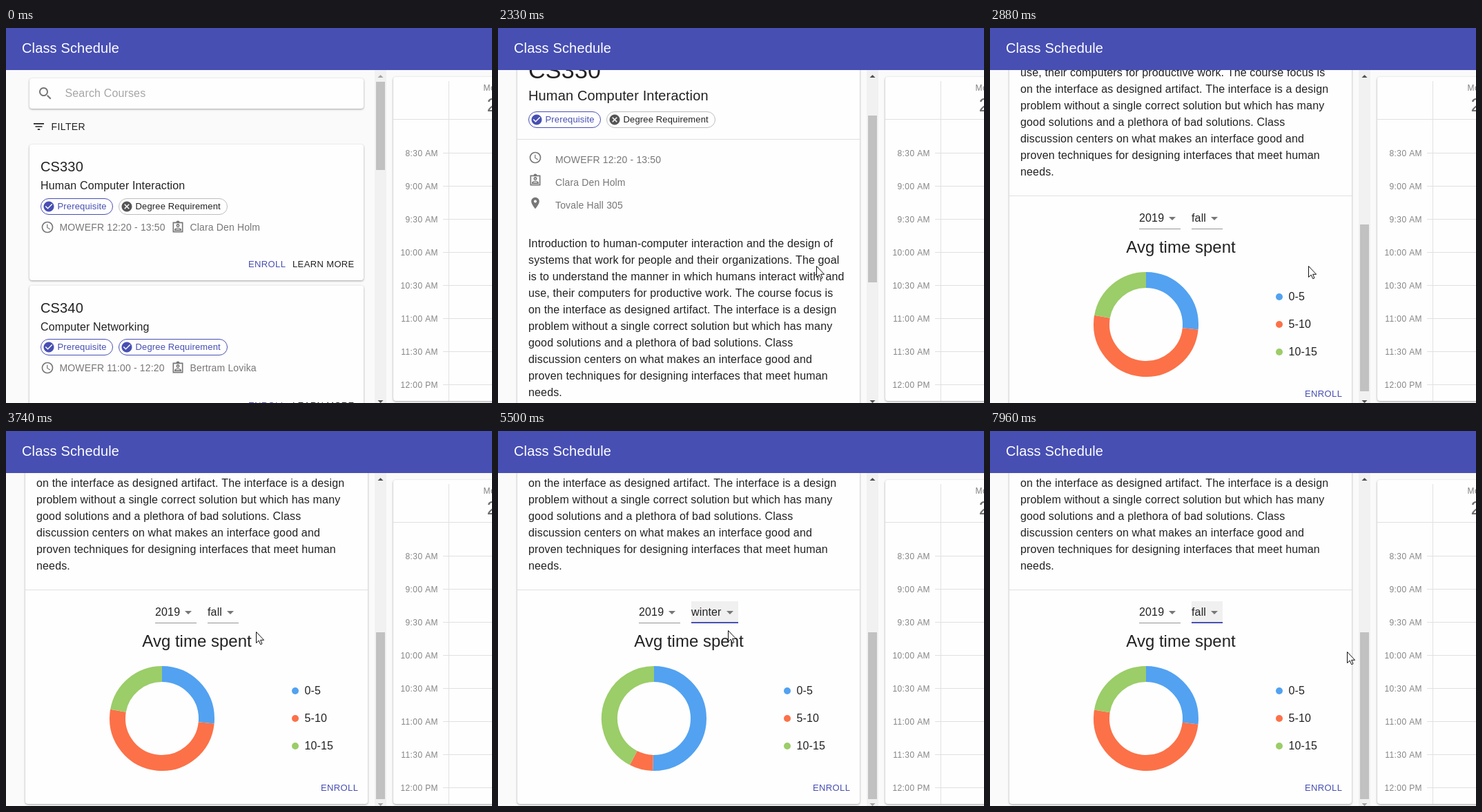
An HTML page with a canvas for the animation above (8000 ms loop, 704x544 px).

```html
<!DOCTYPE html>
<html lang="en">
<head>
<meta charset="utf-8">
<title>Class Schedule</title>
<style>
html, body { margin: 0; width: 100%; height: 100%; overflow: hidden; background: #fafafa; }
canvas { display: block; }
</style>
</head>
<body>
<canvas id="stage" width="704" height="544"></canvas>
<script>
const ctx = document.getElementById('stage').getContext('2d');
const LOOP = 8000;
const INDIGO = '#474fb3', INK = '#222', GREY = '#777', RULE = '#e0e0e0';
const SERIES = [['#52a2f1', '0-5'], ['#fc7148', '5-10'], ['#9bcd68', '10-15']];
const FALL = [95.6, 280], WINTER = [187.2, 202.5];   // slice ends in degrees
const TEACHER = 'Clara Den Holm', HOURS = 'MOWEFR 12:20 - 13:50';

// The picture only moves inside these spans, in 80 ms steps.
const SPANS = [[450, 930], [1320, 1320], [1470, 1550], [2330, 2570], [2720, 2960],
  [3500, 4220], [4380, 4460], [4700, 4700], [4860, 5900], [6060, 6300],
  [6450, 6680], [6840, 6920], [7080, 7960]];
const CLICKS = [[1320, 1470], [3980, 4060], [4700, 4860], [6450, 6530], [7080, 7160]];
// time, x, y of the pointer
const PATH = [[400, 590, 546], [930, 461, 345], [3430, 461, 345], [3900, 325, 271],
  [4300, 325, 271], [4460, 333, 294], [4860, 333, 294], [5020, 333, 289], [6000, 333, 289],
  [6300, 331, 270], [6760, 331, 270], [6920, 331, 229], [7080, 331, 229], [7880, 517, 320]];

const DESCRIPTION = [
  'Introduction to human-computer interaction and the design of',
  'systems that work for people and their organizations. The goal',
  'is to understand the manner in which humans interact with, and',
  'use, their computers for productive work. The course focus is',
  'on the interface as designed artifact. The interface is a design',
  'problem without a single correct solution but which has many',
  'good solutions and a plethora of bad solutions. Class',
  'discussion centers on what makes an interface good and',
  'proven techniques for designing interfaces that meet human',
  'needs.'];

const ICONS = {
  search: 'M9.5 3a6.5 6.5 0 1 0 .01 0zM9.5 5a4.5 4.5 0 1 1-.01 0zM14 15.5l1.5-1.5 5 5-1.5 1.5z',
  filter: 'M3 6h18v2H3zM6 11h12v2H6zM10 16h4v2h-4z',
  clock: 'M12 2a10 10 0 1 0 .01 0zM12 4a8 8 0 1 1-.01 0zM11 7h1.5v5.25l4.5 2.67-.75 1.23L11 13z',
  badge: 'M3 3h6a3 2.4 0 0 1 6 0h6v18H3zM5 5v14h14V5zM12 6a3 3 0 1 0 .01 0zM12 8a1 1 0 1 1-.01 0z' +
    'M6 16.5c0-5 12-5 12 0V18H6zM8 16h8c-1-2-7-2-8 0z',
  pin: 'M12 2c-3.9 0-7 3.1-7 7 0 5.3 7 13 7 13s7-7.7 7-13c0-3.9-3.1-7-7-7zM12 6.5a2.5 2.5 0 1 1-.01 0z',
  yes: 'M12 2a10 10 0 1 0 .01 0zM10 17l-5-5 1.4-1.4 3.6 3.6 7.6-7.6L19 8z',
  no: 'M12 2a10 10 0 1 0 .01 0zM17 15.6L15.6 17 12 13.4 8.4 17 7 15.6l3.6-3.6L7 8.4 8.4 7l3.6 3.6L15.6 7 17 8.4 13.4 12z'
};
for (const name in ICONS) ICONS[name] = new Path2D(ICONS[name]);
const ARROW = new Path2D('M.5.5v16l3.7-3.4 2.5 5.6 2.3-1-2.4-5.4h5z');
const HAND = new Path2D('M-2 2a2 2 0 0 1 4 0v6c.8-1 2.8-.7 3 .8 .8-.8 2.4-.4 2.6 1 .9-.6 2.4 0 2.4 1.6V15' +
  'c0 2-1.3 3.6-1.8 5.2V22.5H0V20.5c-1.3-2-4.4-5.5-5.4-7.6-.8-2 1-3 2.4-1.6l1 1.2z');

const ramp = (t, a, b) => Math.min(1, Math.max(0, (t - a) / (b - a)));
const mix = (a, b, k) => a + (b - a) * k;
const smooth = k => k * k * (3 - 2 * k);
const easeOut = (k, power) => 1 - (1 - k) ** power;

function stepped(t) {
  let now = 0;
  for (const [a, b] of SPANS) if (t >= a) now = Math.min(b, a + Math.floor((t - a) / 80) * 80);
  return now;
}

function rect(x, y, w, h, color) {
  ctx.fillStyle = color;
  ctx.fillRect(x, y, w, h);
}

function round(x, y, w, h, r) {
  ctx.beginPath();
  ctx.roundRect(x, y, w, h, r);
}

function disc(x, y, r, color) {
  ctx.beginPath();
  ctx.arc(x, y, r, 0, 7);
  ctx.fillStyle = color;
  ctx.fill();
}

function text(s, x, y, size = 16, color = INK, spacing = .15, align = 'left') {
  ctx.font = size + 'px "Liberation Sans", Arial, sans-serif';
  ctx.letterSpacing = spacing + 'px';
  ctx.textAlign = align;
  ctx.fillStyle = color;
  ctx.fillText(s, x, Math.round(y));
}

function icon(name, cx, cy, size, color) {
  ctx.save();
  ctx.translate(cx - size / 2, cy - size / 2);
  ctx.scale(size / 24, size / 24);
  ctx.fillStyle = color;
  ctx.fill(ICONS[name], 'evenodd');
  ctx.restore();
}

function paper(x, y, w, h, blur = 3, drop = 1, shade = .36) {
  ctx.save();
  ctx.shadowColor = `rgba(0,0,0,${shade})`;
  ctx.shadowBlur = blur;
  ctx.shadowOffsetY = drop;
  ctx.fillStyle = '#fefefe';
  round(x, y, w, h, 4);
  ctx.fill();
  ctx.restore();
}

function triangle(cx, y, half, h, color) {
  ctx.beginPath();
  ctx.moveTo(cx - half, y);
  ctx.lineTo(cx + half, y);
  ctx.lineTo(cx, y + h);
  ctx.fillStyle = color;
  ctx.fill();
}

function chip(x, y, w, label, on) {
  round(x + .5, y + .5, w - 1, 23, 11.5);
  ctx.strokeStyle = on ? INDIGO : '#bdbdbd';
  ctx.lineWidth = 1;
  ctx.stroke();
  icon(on ? 'yes' : 'no', x + 12, y + 12, 18, on ? INDIGO : '#555');
  text(label, x + 24.5, y + 16, 13, on ? INDIGO : INK);
}

function chips(x, y, required) {
  chip(x, y, 105, 'Prerequisite', true);
  chip(x + 113, y, 158, 'Degree Requirement', required);
}

function courseCard(y, code, name, hours, teacher, required, hover) {
  paper(34, y, 484, 197);
  text(code, 50, y + 39, 20);
  text(name, 50, y + 65);
  chips(50, Math.round(y + 77.8), required);
  const row = Math.round(y + 119.8);
  icon('clock', 60, row, 20, GREY);
  text(hours, 77.5, row + 5, 14, GREY);
  icon('badge', 249, row, 20, GREY);
  text(teacher, 266.5, row + 5, 14, GREY);
  if (hover) {
    round(410, y + 158, 100, 30, 4);
    ctx.fillStyle = 'rgba(0,0,0,.04)';
    ctx.fill();
  }
  text('ENROLL', 351, y + 178, 13, INDIGO, .37);
  text('LEARN MORE', 415, y + 178, 13, INK, .37);
}

function listPage(hover) {
  paper(34, 73, 484, 44);
  icon('search', 57, 95, 24, GREY);
  text('Search Courses', 85.5, 100, 16, '#a6a6a6');
  icon('filter', 47.5, 143, 20, INK);
  text('FILTER', 65.5, 148, 14, INK, .4);
  courseCard(169, 'CS330', 'Human Computer Interaction', HOURS, TEACHER, false, hover);
  courseCard(373.5, 'CS340', 'Computer Networking', 'MOWEFR 11:00 - 12:20', 'Bertram Lovika', true);
}

function select(x, w, label, focused) {
  if (focused) rect(x, 679, w, 32, '#f0f0f0');
  text(label, x, 700);
  triangle(x + w - 12, 693, 5, 5, GREY);
  if (focused) rect(x, 709, w, 2, INDIGO);
  else rect(x, 710, w, 1, '#949494');
}

function donut(k) {
  const ends = [0, mix(FALL[0], WINTER[0], k), mix(FALL[1], WINTER[1], k), 360];
  ctx.lineWidth = 23;
  SERIES.forEach(([color, label], i) => {
    ctx.beginPath();
    ctx.arc(226, 849, 64.5, (ends[i] - 90) * Math.PI / 180, (ends[i + 1] - 90) * Math.PI / 180);
    ctx.strokeStyle = color;
    ctx.stroke();
    disc(419, 809 + 40 * i, 5, color);
    text(label, 432.5, 814 + 40 * i);
  });
}

function detailPage(t) {
  const winter = t >= 4860 && t < 7080;
  paper(28, 71, 496, 902);
  text('BACK', 48, 102, 14, INK, .4);
  for (const y of [123, 260, 662]) rect(28, y, 496, 1, RULE);
  text('CS330', 44, 172, 34, INK, .25);
  text('Human Computer Interaction', 44, 204, 20);
  chips(44, 220, false);
  [['clock', HOURS], ['badge', TEACHER], ['pin', 'Tovale Hall 305']].forEach(([name, label], i) => {
    icon(name, 54, 287 + 33 * i, 20, GREY);
    text(label, 83, 295 + 33 * i, 14, GREY);
  });
  DESCRIPTION.forEach((line, i) => text(line, 44, 417 + 24 * i));

  const left = winter ? 204 : 216;
  select(left, 60, '2019');
  select(left + 76, winter ? 68 : 45, winter ? 'winter' : 'fall', t >= 3980);
  text('Avg time spent', 276.5, 745, 24, INK, 0, 'center');
  donut(easeOut(ramp(t, 4900, 5900), 3) - easeOut(ramp(t, 7160, 8160), 3));
  text('ENROLL', 456, 954, 13, INDIGO, .37);
}

function scrollbar(y, detail) {
  rect(534, 61, 17, 483, '#f1f1f1');
  rect(536, 78 + Math.round(y * .495), 13, detail ? 242 : 128, '#c1c1c1');
  triangle(542.5, 72, 4, -4, y > 0 ? '#505050' : '#a3a3a3');
  triangle(542.5, 540, 4, 4, y < 432 ? '#505050' : '#a3a3a3');
}

function calendar() {
  paper(561, 71, 160, 470);
  rect(561, 132, 143, 1, RULE);
  rect(641, 77, 1, 464, RULE);
  text('Mon', 691.5, 91, 12, '#808080', .4);
  text('2', 696.5, 121, 28, '#707070');
  for (let i = 0; i < 8; i++) {
    const y = 181 + 48 * i, min = 510 + 30 * i, hour = Math.floor(min / 60);
    rect(633, y, 71, 1, RULE);
    text(`${hour}:${min % 60 ? '30' : '00'} ${hour < 12 ? 'AM' : 'PM'}`, 626, y + 5, 12, '#858585', .4, 'right');
  }
}

// The chosen item always lies over the select, so the paper shifts with it.
function menu(open, second, pointerY) {
  if (!open) return;
  const x = second ? 280 : 292, top = second ? 201 : 237, s = 1 - .25 * (1 - open) ** 2;
  ctx.save();
  ctx.globalAlpha = open;
  ctx.translate(x + 38, 263);
  ctx.scale(s, s);
  ctx.translate(-x - 38, -263);
  paper(x, top, 76, 88, 9, 4, .38);
  ['fall', 'winter'].forEach((label, i) => {
    const y = top + 8 + 36 * i;
    if (i === +second) rect(x, y, 76, 36, '#ebebeb');
    else if (pointerY >= y && pointerY < y + 36) rect(x, y, 76, 36, '#f5f5f5');
    text(label, x + 16, y + 23);
  });
  ctx.restore();
}

function pointerAt(t) {
  const i = PATH.findIndex(p => p[0] > t);
  if (i === 0) return PATH[0].slice(1);
  if (i < 0) return PATH[PATH.length - 1].slice(1);
  const [a, ax, ay] = PATH[i - 1], [b, bx, by] = PATH[i];
  const k = smooth(ramp(t, a, b));
  return [mix(ax, bx, k), mix(ay, by, k)];
}

function pointer(t, x, y, hand) {
  if (CLICKS.some(([a, b]) => t >= a && t < b)) disc(x, y, 12, 'rgba(255,240,20,.72)');
  ctx.save();
  ctx.translate(Math.round(x), Math.round(y));
  ctx.fillStyle = '#fff';
  ctx.strokeStyle = '#111';
  ctx.lineWidth = 1;
  const shape = hand ? HAND : ARROW;
  ctx.fill(shape);
  ctx.stroke(shape);
  ctx.restore();
}

function draw(t) {
  const detail = t >= 1470, second = t >= 6370;
  const scroll = Math.round(200 * easeOut(ramp(t, 2232, 2570), 2) + 232 * easeOut(ramp(t, 2622, 2960), 2));
  const open = second ? ramp(t, 6370, 6570) - ramp(t, 7020, 7220)
    : ramp(t, 4000, 4200) - ramp(t, 4800, 5000);
  const [x, y] = pointerAt(t);
  const inside = (l, r, top, bottom) => x >= l && x <= r && y >= top && y <= bottom;
  const overButton = !detail && inside(410, 510, 327, 357);
  const overSelect = scroll === 432 && inside(292, 337, 247, 279);

  rect(0, 0, 704, 544, '#fafafa');
  ctx.save();
  ctx.translate(0, -scroll);
  if (detail) detailPage(t);
  else listPage(overButton);
  ctx.restore();
  scrollbar(scroll, detail);
  calendar();
  rect(0, 0, 704, 61, INDIGO);
  text('Class Schedule', 23, 36, 20, '#fff');
  menu(open, second, y);
  pointer(t, x, y, overButton || overSelect || open > 0);
}

function tick(now) {
  draw(stepped(now % LOOP));
  requestAnimationFrame(tick);
}
requestAnimationFrame(tick);
</script>
</body>
</html>
```
